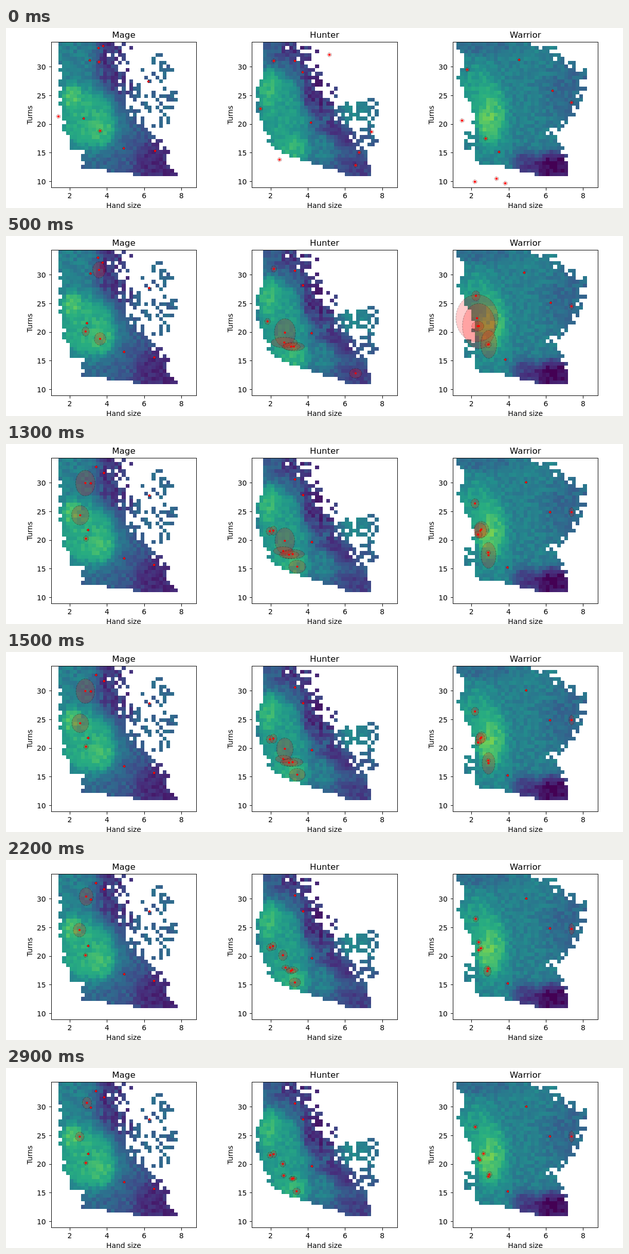
These frames come from a looping animation (1200x350 px, 3000 ms). An HTML page:

```html
<!DOCTYPE html>
<html lang="en">
<head>
<meta charset="utf-8">
<title>Hand size and turns</title>
<style>
  html, body { margin: 0; width: 100%; height: 100%; overflow: hidden; background: #fff; }
  svg { display: block; width: 1200px; height: 350px; }
  text { font: 13.89px "DejaVu Sans", Verdana, sans-serif; text-anchor: middle; }
  .title { font-size: 16.67px; }
  .tick { text-anchor: end; }
  .cells, .axes { shape-rendering: crispEdges; }
  .axes { fill: none; stroke: #000; }
  .spread { fill: rgba(255, 0, 0, .2); stroke: rgba(0, 0, 0, .3); stroke-dasharray: 3.7 1.6; }
  .dot { fill: #f00; }
</style>
</head>
<body>
<svg id="stage" viewBox="0 0 1200 350"></svg>
<script>
const LEFT = 87.7, STEP = 390.6, TOP = 27.4, SIZE = 282.5, N = 39, CELL = SIZE / N;
const TICK = 100, LOOP = 3000;
const VIRIDIS = ['440154', '472d7b', '3b528b', '2c728e', '21918c', '28ae80', '5ec962', 'addc30', 'fde725']
  .map(h => [0, 2, 4].map(i => parseInt(h.slice(i, i + 2), 16)));

const stage = document.getElementById('stage');
const lerp = (a, b, k) => a + (b - a) * k;

function add(parent, tag, attrs, label) {
  const el = document.createElementNS('http://www.w3.org/2000/svg', tag);
  for (const key in attrs) el.setAttribute(key, attrs[key]);
  if (label !== undefined) el.textContent = label;
  parent.append(el);
  return el;
}

// Repeatable random number for a pair of integers
function hash(c, r, seed) {
  let h = Math.imul(c + 11, 374761393) ^ Math.imul(r + 7, 668265263) ^ Math.imul(seed + 3, 2246822519);
  h = Math.imul(h ^ (h >>> 13), 1274126177);
  h = Math.imul(h ^ (h >>> 16), 2246822519);
  return ((h ^ (h >>> 15)) >>> 0) / 4294967296;
}

function color(v) {
  const p = Math.min(.999, Math.max(0, v)) * 8, i = Math.floor(p);
  return `rgb(${VIRIDIS[i].map((a, j) => Math.round(lerp(a, VIRIDIS[i + 1][j], p - i)))})`;
}

// Column of an edge at row r, from a few [row, column] corners
function edgeAt(corners, r) {
  const i = Math.max(1, corners.findIndex(p => p[0] >= r));
  const [a, b] = [corners[i - 1], corners[i]];
  return lerp(a[1], b[1], (r - a[0]) / (b[0] - a[0]));
}

const distance = (c, r, [x, y, w, h]) => Math.hypot((c - x) / w, (r - y) / h);

function isFilled(map, c, r, seed) {
  const chance = hash(c, r, seed);
  if (map.clouds.some(cloud => distance(c, r, cloud) < 1 && chance < cloud[4])) return true;
  if (r > 35 || c < edgeAt(map.left, r) - .8 + hash(c, r, seed + 30)) return false;
  const ragged = lerp(map.ragged, 1.5, r / 35);
  return chance < .5 + (edgeAt(map.right, r) - c) / ragged;
}

// Soft ellipses painted over the base level: x, y, half width, half height, value
function levelAt({ base, blobs }, c, r) {
  return blobs.reduce((v, blob) => lerp(v, blob[4], 1 / (1 + distance(c, r, blob) ** 6)), base);
}

function drawCells(group, map, left, seed) {
  const snap = (o, i) => Math.round(o + i * CELL);
  for (let r = 0; r < N; r++) for (let c = 0; c < N; c++) {
    if (!isFilled(map, c, r, seed)) continue;
    const level = levelAt(map, c, r), x = snap(left, c), y = snap(TOP, r);
    const noise = level < .28 && r < 22 ? .2 : .11;
    add(group, 'rect', {
      x, y, width: snap(left, c + 1) - x, height: snap(TOP, r + 1) - y,
      fill: color(level + (hash(c, r, seed + 10) - .5) * noise)
    });
  }
}

function drawAxes(name, left) {
  const [x0, x1, y0, y1] = [left, left + SIZE, TOP, TOP + SIZE].map(v => Math.round(v) + .5);
  const mid = left + SIZE / 2;
  const axes = add(stage, 'g', { class: 'axes' });
  add(axes, 'rect', { x: x0, y: y0, width: x1 - x0, height: y1 - y0 });
  for (let v = 2; v <= 8; v += 2) {
    const x = left + 36.2 * (v - 1);
    add(axes, 'path', { d: `M${Math.round(x) + .5} ${y1}v5` });
    add(stage, 'text', { x, y: 331 }, v);
  }
  for (let v = 10; v <= 30; v += 5) {
    const y = 298.5 - 11.13 * (v - 10);
    add(axes, 'path', { d: `M${x0} ${Math.floor(y) + .5}h-5` });
    add(stage, 'text', { x: left - 10, y: Math.round(y + 5), class: 'tick' }, v);
  }
  add(stage, 'text', { x: mid, y: 19, class: 'title' }, name);
  add(stage, 'text', { x: mid, y: 350 }, 'Hand size');
  add(stage, 'text', { transform: `translate(${Math.round(left) - 37} 169) rotate(-90)` }, 'Turns');
}

const maps = {
  Mage: {
    left: [[0, 2], [17, 2], [24, 4], [28, 5], [29, 8], [33, 8], [35, 22]],
    right: [[0, 18], [9, 19], [15, 21], [20, 23], [28, 30], [35, 33]],
    ragged: 8,
    clouds: [[28, 13, 5.5, 11, .3]],
    base: .3,
    blobs: [
      [5, 4, 8, 10, .42], [17, 6, 5, 11, .16], [9, 20, 8, 8.5, .61], [5, 14, 2.5, 3, .7],
      [13, 23, 3, 4, .66], [29, 32, 7, 7, .12], [28, 12, 5, 9, .33]
    ]
  },
  Hunter: {
    left: [[0, 3], [8, 3], [12, 1], [18, 1], [22, 3], [28, 5], [30, 9], [32, 16], [35, 25]],
    right: [[0, 12], [6, 16], [14, 20], [18, 22], [22, 25], [28, 29], [35, 32]],
    ragged: 9,
    clouds: [[27, 18, 5, 3, .8], [31, 21, 3, 7, .5]],
    base: .3,
    blobs: [
      [12, 4, 6, 8, .15], [8, 19, 7, 12, .55], [4, 12, 3, 5, .64], [12, 28, 5, 3, .65], [18, 13, 5, 6, .14],
      [23, 24, 5, 4, .12], [18, 28, 4, 4, .42], [28, 33, 5, 3, .18], [28, 19, 5, 4, .46]
    ]
  },
  Warrior: {
    left: [[0, 1], [5, 3], [9, 1], [14, 3], [16, 5], [32, 6], [33, 14], [35, 22]],
    right: [[0, 20], [3, 27], [7, 34], [12, 35], [17, 33], [21, 30], [24, 25], [30, 30], [35, 31]],
    ragged: 7,
    clouds: [[26, 3, 4, 3, .3], [4, 26, 2, 3, .5]],
    base: .43,
    blobs: [
      [8, 1, 7, 2.5, .35], [6, 14, 4, 8, .56], [10, 19, 4, 8, .66], [9, 21, 2, 4, .74],
      [33, 13, 8, 11, .34], [19, 32, 3, 3, .2], [27, 33, 6, 4, .04]
    ]
  }
};

const groups = Object.entries(maps).map(([name, map], i) => {
  const left = LEFT + STEP * i;
  const clip = add(stage, 'clipPath', { id: name });
  add(clip, 'rect', { x: left, y: TOP, width: SIZE, height: SIZE });
  drawCells(add(stage, 'g', { class: 'cells' }), map, left, i);
  const group = add(stage, 'g', { 'clip-path': `url(#${name})` });
  drawAxes(name, left);
  return group;
});

// A searcher goes from start to home; its spread is widest at the peak tick
const searchers = [];
function search(panel, start, home, reach, peak) {
  const spread = add(groups[panel], 'ellipse', { class: 'spread' });
  const dot = add(groups[panel], 'circle', { class: 'dot', r: 2.1 });
  searchers.push({ start, home, reach, peak, spread, dot });
}

search(0, [189, 35], [175, 45]);
search(0, [180, 39], [191, 57]);
search(0, [181, 66], [155, 72], [15, 21], 12);
search(0, [163, 63], [165, 77]);
search(0, [277, 104], [279, 100]);
search(0, [151, 176], [160, 167]);
search(0, [183, 200], [143, 136], [13, 15], 12);
search(0, [102, 172], [155, 185], [3, 5], 5);
search(0, [229, 234], [230, 222]);
search(0, [290, 239], [288, 235]);

search(1, [521, 64], [520, 168], [3, 5], 15);
search(1, [562, 64], [562, 69]);
search(1, [577, 86], [578, 100]);
search(1, [495, 157], [514, 170], [3, 4], 14);
search(1, [593, 184], [595, 191]);
search(1, [629, 52], [540, 185], [20, 28], 8);
search(1, [711, 202], [558, 214], [22, 6], 9);
search(1, [532, 256], [542, 208], [24, 7], 7);
search(1, [687, 242], [553, 215], [18, 4], 9);
search(1, [680, 267], [564, 238], [13, 9], 11);

search(2, [897, 81], [913, 116], [5, 7], 8);
search(2, [998, 62], [1012, 75]);
search(2, [1063, 122], [1058, 133]);
search(2, [1100, 145], [1100, 133], [1, 7], 25);
search(2, [887, 180], [922, 162], [37, 42], 5);
search(2, [912, 299], [923, 174], [28, 40], 5);
search(2, [933, 215], [918, 176], [8, 6], 6);
search(2, [971, 302], [938, 211], [14, 28], 8);
search(2, [954, 293], [938, 211], [2, 2], 5);
search(2, [959, 241], [976, 240]);

// Short ways are glided, long ways are one jump before the peak
function poseAt({ start, home, reach, peak }, tick, id) {
  const far = Math.hypot(home[0] - start[0], home[1] - start[1]) > 25;
  const move = far ? +(tick >= Math.max(1, peak - 4)) : 1 - Math.exp(-tick / 4);
  const [cx, cy] = start.map((v, i) => {
    const drift = reach ? (hash(id, Math.floor(tick / 4), 40 + i) - .5) * reach[i] * .4 : 0;
    return lerp(v, home[i] + drift, move);
  });
  const k = tick / peak, pulse = (k * Math.exp(1 - k)) ** 2;
  const [rx, ry] = reach ? reach.map(v => 4 + v * pulse) : [2.5, 2.5];
  return { cx, cy, rx, ry };
}

let shown = -1;
function draw() {
  const tick = Math.floor(performance.now() % LOOP / TICK);
  if (tick !== shown) {
    shown = tick;
    searchers.forEach((item, id) => {
      const pose = poseAt(item, tick, id);
      for (const key in pose) item.spread.setAttribute(key, pose[key]);
      item.dot.setAttribute('cx', pose.cx);
      item.dot.setAttribute('cy', pose.cy);
    });
  }
  requestAnimationFrame(draw);
}
draw();
</script>
</body>
</html>
```
